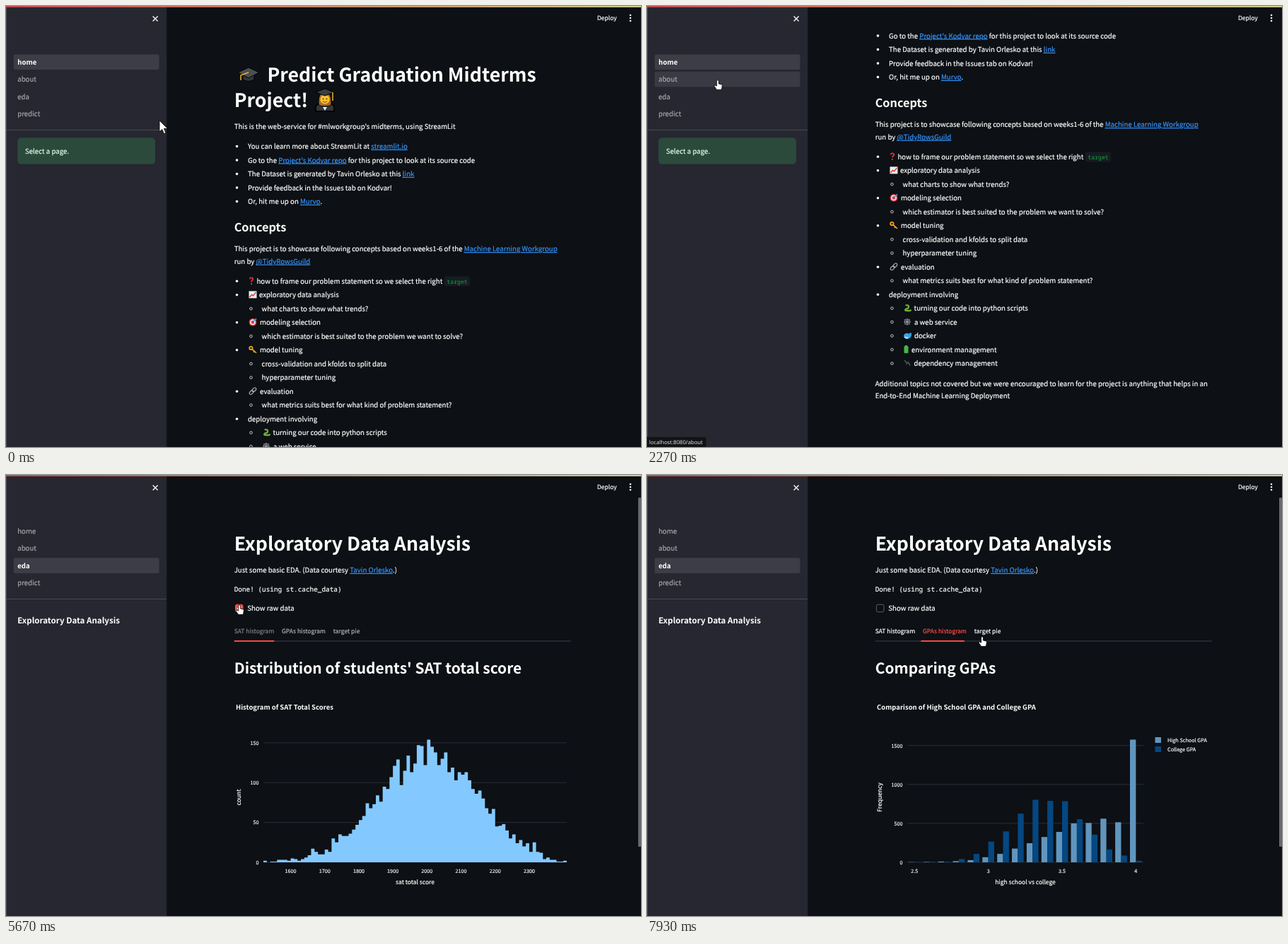
Animation, 898 px wide and 624 px high, one loop 8 s. Source, as an HTML page:

```html
<!DOCTYPE html>
<html lang="en">
<head>
<meta charset="utf-8">
<title>Midterm project demo</title>
<style>
html, body { margin: 0; width: 100%; height: 100%; overflow: hidden; background: #0d1014; }
svg { display: block; width: 100vw; height: 100vh; }
text {
  font: 9.68px "Noto Sans CJK JP", "Noto Sans CJK SC", "Noto Sans CJK KR", "Noto Sans CJK", "Noto Sans", sans-serif;
  color: #fff; stroke-width: .2px; white-space: pre; text-rendering: geometricPrecision;
}
text, tspan { fill: currentColor; stroke: currentColor; }
.h1, .h2, .h3 { font-weight: 700; stroke-width: 0; }
.h1 { font-size: 26.7px; }
.h2 { font-size: 20.95px; }
.h3 { font-size: 16.3px; }
.side { font-size: 11.55px; font-weight: 700; stroke-width: 0; }
.ct { font-size: 9.5px; font-weight: 700; stroke-width: 0; }
.s { font-size: 8.47px; }
.xs { font-size: 7.26px; color: #f0f3f8; }
.mid { text-anchor: middle; }
.end { text-anchor: end; }
.mono { font: 9.4px "Noto Sans Mono", "DejaVu Sans Mono", monospace; }
.code { font-size: 8.1px; color: #0fa844; stroke-width: 0; }
.tip { font: 7.7px "Open Sans", "Noto Sans", sans-serif; color: #eeeef0; stroke-width: 0; }
.dim { color: #8a8c91; }
.a { color: #3394ff; text-decoration: underline; }
.i { font-style: italic; }
.b { font-weight: 600; color: #b4b6ba; stroke-width: 0; }
</style>
</head>
<body>
<svg id="stage" viewBox="0 0 898 624" preserveAspectRatio="none"></svg>
<script>
const stage = document.getElementById('stage');
const RED = '#ff4b4b', GRID = '#292d36', BACK = '#0d1014';

// [link]  _italic_  *strong*
const rich = s => s
  .replace(/\[(.+?)\]/g, '<tspan class="a">$1</tspan>')
  .replace(/(^|\s)_(\w+)_/g, '$1<tspan class="i">$2</tspan>')
  .replace(/\*(.+?)\*/g, '<tspan class="b">$1</tspan>');
const text = (x, y, s, cls = '', more = '') =>
  `<text x="${x}" y="${y}" class="${cls}" ${more}>${rich(s)}</text>`;
const rect = (x, y, w, h, fill, more = '') =>
  `<rect x="${x}" y="${y}" width="${w}" height="${h}" fill="${fill}" ${more}/>`;
const circle = (x, y, r, fill, more = '') =>
  `<circle cx="${x}" cy="${y}" r="${r}" fill="${fill}" ${more}/>`;
const path = (d, fill, stroke = 'none', w = 1, more = '') =>
  `<path d="${d}" fill="${fill}" stroke="${stroke}" stroke-width="${w}" ${more}/>`;
const group = (id, body, more = '') => `<g id="${id}" ${more}>${body}</g>`;
const at = (x, y, body) => `<g transform="translate(${x} ${y})">${body}</g>`;
const round = 'stroke-linecap="round" stroke-linejoin="round"';
const bullet = (x, y) => circle(x, y, 1.8, '#fafafa');
const ring = (x, y) => circle(x, y, 1.8, 'none', 'stroke="#fafafa" stroke-width=".8"');

const icon = {
  ask: path('M-2.2-2.6Q-2-4.6 0-4.6T2.3-2.6Q2.3-1.2 .8-.3 0 .3 0 1.6', 'none', '#e0303a', 1.8) + circle(0, 4.2, 1.2, '#e0303a'),
  chart: rect(-5.5, -5, 11, 10, '#eceff1') + path('M-4.5 3.5L-1.5 0 .5 1.5 4.5-3.5', 'none', '#e53935', 1.5),
  goal: circle(0, 0, 5.4, '#d8343c') + circle(0, 0, 3.8, '#f5f5f5') + circle(0, 0, 2.3, '#d8343c') + path('M0 0L5-5', 'none', '#3aa0e8', 1.6),
  key: circle(-2.6, -2.4, 2.2, 'none', 'stroke="#f5a21f" stroke-width="1.8"') + path('M-1-1L5 4.6M2.2 2L.8 3.4', 'none', '#f5a21f', 1.7),
  chain: '<g transform="rotate(-45)" fill="none" stroke="#a9b3b9" stroke-width="1.2"><rect x="-6" y="-2" width="6.5" height="4" rx="2"/><rect x="-.5" y="-2" width="6.5" height="4" rx="2"/></g>',
  snake: path('M-1.5-4Q2.5-4.5 2-1.5T-1.5 1Q-5 3.5 0 3.8T4.8 3', 'none', '#6fae3d', 2.3, round),
  web: path('M-5 0H5M0-5V5M-3.6-3.6L3.6 3.6M-3.6 3.6L3.6-3.6', 'none', '#9aa0a6', .8) + circle(0, 0, 2, 'none', 'stroke="#9aa0a6" stroke-width=".8"') + circle(0, 0, 4, 'none', 'stroke="#9aa0a6" stroke-width=".8"'),
  whale: path('M-5.5 0Q-4-4 0-3.4 3-3 3.4-1L2.4-4 5.6-3.6Q6 4.5 0 4.5-5 4.5-5.5 0Z', '#35a7e6') + path('M-5 1Q-2 3 1 1.5L0 4.3Q-4 4.5-5 1Z', '#c6e6f8'),
  cell: rect(-3, -4.6, 6, 10, '#45b649', 'rx="1"') + rect(-1.3, -5.8, 2.6, 1.4, '#9aa0a6'),
  plug: path('M-4-4L0 0M-1.5 1.5L1.5-1.5 4 3.5', 'none', '#4a5055', 1.8),
  sign: rect(-5.5, -5.5, 11, 11, '#8f5bb5', 'rx="1.5"') + path('M-3 3L3-3M-.5-3H3V.5M-2.5-.5L.5 2.5', 'none', '#fff', 1.1),
  cap: path('M-8 0V7Q0 12 8 7V0Z', '#33373a', '#000', 1) + path('M-15-3L0-10 15-3 0 5Z', '#4a4f52', '#000', 1) + path('M0-3L-11 1V8', 'none', '#f0b429', 1.5),
  grad: path('M-13 16V10Q-12 4 0 4T13 10V16Z', '#33373a', '#000', 1.8) + path('M-9 5Q-10-11 0-11T9 5Q9 9 0 9T-9 5Z', '#a8682f', '#000', 1)
    + circle(0, -1, 6.6, '#fcc32c') + path('M-3.2 2Q0 4.5 3.2 2', 'none', '#6b4423', 1) + circle(-2.5, -1.5, .9, '#40331d') + circle(2.5, -1.5, .9, '#40331d')
    + path('M-13-11L0-16 13-11 0-6Z', '#3a3f42', '#000', 1) + path('M11-11V1', 'none', '#f0b429', 1.5) + path('M-3 10L0 15 3 10Z', '#eee'),
  wave: path('M-8-6L2 5M-4-10L5 2M1-10L8 1M6-6L10 4', 'none', '#fcc32c', 4.6, round) + path('M-8-1L3-4 10-3 12-6Q15-4 13 5 11 13 4 13T-6 7Z', '#fcc32c')
    + path('M-5-3L2 4M0-5L5 1', 'none', '#c98b1b', .8) + path('M-13 2Q-12 9-5 13M-10 1Q-8 6-4 9M4-14Q10-13 13-9M5-11Q9-10 11-8', 'none', '#2f8fe0', 1.5, round)
};

function homePage() {
  const top = ['You can learn more about StreamLit at [streamlit.io]',
    "Go to the [Project's Kodvar repo] for this project to look at its source code",
    'The Dataset is generated by Tavin Orlesko at this [link]',
    'Provide feedback in the Issues tab on Kodvar!', 'Or, hit me up on [Murvo].'];
  // level, text, text x, icon, icon x
  const items = [
    [0, 'how to frame our problem statement so we select the right', 354.5, 'ask', 347],
    [0, 'exploratory data analysis', 358, 'chart', 349],
    [1, 'what charts to show what trends?'],
    [0, 'modeling selection', 359, 'goal', 349],
    [1, 'which estimator is best suited to the problem we want to solve?'],
    [0, 'model tuning', 359, 'key', 349],
    [1, 'cross-validation and kfolds to split data'],
    [1, 'hyperparameter tuning'],
    [0, 'evaluation', 359, 'chain', 349],
    [1, 'what metrics suits best for what kind of problem statement?'],
    [0, 'deployment involving'],
    [1, 'turning our code into python scripts', 377.5, 'snake', 368],
    [1, 'a web service', 378, 'web', 368],
    [1, 'docker', 378, 'whale', 368.5],
    [1, 'environment management', 374, 'cell', 366.5],
    [1, 'dependency management', 377.5, 'plug', 368]];
  return at(343, 97, icon.cap) + text(369.5, 107, 'Predict Graduation Midterms', 'h1')
    + text(322.7, 143, 'Project!', 'h1') + at(451, 133, icon.grad)
    + text(322.7, 173.8, "This is the web-service for #mlworkgroup's midterms, using StreamLit")
    + top.map((s, i) => bullet(326.5, 198.6 + 19.5 * i) + text(342, 202 + 19.5 * i, s)).join('')
    + text(322.7, 319.3, 'Concepts', 'h3')
    + text(322.7, 347.2, 'This project is to showcase following concepts based on weeks1-6 of the [Machine Learning Workgroup]')
    + text(322.7, 364.8, 'run by [@TidyRowsGuild]')
    + rect(620, 382.5, 36, 14, '#171c22', 'rx="2"') + text(623.5, 392.6, 'target', 'mono code')
    + items.map(([lv, s, x = lv ? 361.5 : 342, ic, ix], i) => {
        const y = 389.2 + 19.5 * i;
        return (lv ? ring(346.5, y) : bullet(326.5, y)) + (ic ? at(ix, y - .3, icon[ic]) : '') + text(x, y + 3.5, s);
      }).join('')
    + text(322.7, 713.5, 'Additional topics not covered but we were encouraged to learn for the project is anything that helps in an')
    + text(322.7, 731, 'End-to-End Machine Learning Deployment');
}

function aboutPage() {
  const paras = [
    [162.5, 'Well, actually Ilvi is my nickname because my real name is quite a mouthful and when we were all little,',
      "my younger cousins (I was the _first_ grandchild) couldn't pronounce the 'v' from Vuna, so one of them",
      'dubbed me "Ilvi" and it stuck. My full name is actually Mirvunadesi.'],
    [225.5, "I got into coding because I've always dug into code when playing games. Some of you who has played The",
      "Plim 3, might recognized my social persona 'ilviwhimsey' from [the world fixes] I made for that game."],
    [271, "I've since dabbled in Quilo 3D modding a few years back, during the pandemic, and released a few mods",
      'for the game [Rebuilding the Lowmarsh]. You can find my mods on the [Brine Workroom].'],
    [316.5, "And now I got the Data-bug - everything is coming up data! I've just started my Data Science studies in the",
      "past year, it's been a year of interesting projects and community building with fellow learners."],
    [362, 'Feel free to connect with me on']];
  const links = ['Jobvanto', 'Kodvar', 'quibbly', 'Inkvellum modding blog', 'Inkvellum ilvistudies blog'];
  return text(324.5, 107, 'Hello, World!', 'h1') + at(522, 97, icon.wave)
    + text(324.5, 138, "I'm Ilvi") + at(367.5, 134.3, icon.sign) + text(377, 138, 'and delighted to make your acquataince.')
    + paras.map(([y, ...ls]) => ls.map((s, i) => text(324.5, y + 3.6 + 17.5 * i, s)).join('')).join('')
    + links.map((s, i) => bullet(328.8, 390.7 + 19.45 * i) + text(344, 394 + 19.45 * i, `[${s}]`)).join('')
    + text(324.5, 613.8, 'Made with *Streamlit*', 's dim');
}

const scores = [2, 0, 1, 1, 3, 3, 3, 2, 5, 4, 2, 4, 6, 9, 17, 13, 10, 10, 16, 13, 30, 25, 35, 33, 33, 36, 41, 47, 53, 58,
  74, 68, 73, 84, 76, 95, 92, 107, 121, 129, 97, 115, 134, 113, 124, 147, 146, 122, 154, 145, 138, 122, 130, 138, 113,
  119, 103, 113, 110, 113, 103, 92, 86, 90, 80, 68, 61, 67, 45, 46, 48, 40, 30, 35, 24, 28, 20, 24, 13, 25, 13, 12, 4, 6, 3, 3, 1, 1, 2];
const highGpa = [3, 5, 10, 15, 28, 65, 108, 176, 245, 325, 390, 500, 505, 560, 514, 1575];
const collegeGpa = [3, 6, 9, 42, 108, 265, 397, 625, 803, 788, 785, 553, 355, 165, 87, 20];

const yAxis = (vals, unit, x1, x2, label, title) =>
  vals.map(v => {
    const y = 548 - v * unit;
    return path(`M${x1} ${y}H${x2}`, 'none', GRID) + text(x1 - 6.5, y + 2.8, String(v), 'xs end');
  }).join('')
  + text(0, 0, label, 's mid', 'transform="translate(332 456) rotate(-90)"') + text(325, 331.6, title, 'ct');

function satChart(right, last) {
  const k = (right - 364) / 429, bin = 4.82 * k;
  const d = scores.map((v, i) => `V${(548 - v * 1.127).toFixed(1)}H${(364 + bin * (i + 1)).toFixed(2)}`).join('');
  let s = text(322.7, 280.6, "Distribution of students' SAT total score", 'h2')
    + yAxis([0, 50, 100, 150], 1.127, 364, right, 'count', 'Histogram of SAT Total Scores') + path(`M364 548${d}V548Z`, '#83c9ff');
  for (let v = 1600; v <= last; v += 100) s += text(364 + bin * (v - 1520) / 10, 562.6, String(v), 'xs mid');
  return s + text((364 + right) / 2, 578.6, 'sat total score', 's mid');
}

function gpaChart() {
  const light = '#6096be', dark = '#054781';
  const bars = (vals, dx, fill) => vals.map((v, i) => rect(378.3 + 20.87 * i + dx, 548 - v * .1102, 8.35, v * .1102, fill)).join('');
  return text(322.7, 280.6, 'Comparing GPAs', 'h2')
    + yAxis([0, 500, 1000, 1500], .1102, 368, 702, 'Frequency', 'Comparison of High School GPA and College GPA')
    + bars(highGpa, -8.35, light) + bars(collegeGpa, 0, dark)
    + [2.5, 3, 3.5, 4].map((v, i) => text(378.3 + 104.35 * i, 562.6, String(v), 'xs mid')).join('')
    + text(535, 578.6, 'high school vs college', 's mid')
    + rect(718.5, 371, 8.5, 8, light) + text(736, 378, 'High School GPA', 'xs')
    + rect(718.5, 384, 8.5, 8, dark) + text(736, 391, 'College GPA', 'xs');
}

const tabs = [['SAT histogram', 322.7], ['GPAs histogram', 390], ['target pie', 462.8]];
const edaPage = () => text(322.7, 107, 'Exploratory Data Analysis', 'h1')
  + text(322.7, 138, 'Just some basic EDA. (Data courtesy [Tavin Orlesko].)')
  + text(322.7, 164.6, 'Done! (using st.cache_data)', 'mono')
  + '<rect id="box" x="324.5" y="183.3" width="10.5" height="10.5" rx="2"/>'
  + path('M327 188.5L329 190.8 332.6 186.4', 'none', '#fff', 1.3, 'id="tick"')
  + text(341.3, 192.4, 'Show raw data')
  + tabs.map(([s, x], i) => text(x, 223.8, s, 's', `id="tab${i}"`)).join('')
  + rect(322.7, 234.3, 476, 1.4, '#31333f') + '<rect id="under" y="234" height="1.9" fill="#ff4b4b"/>'
  + group('satWide', satChart(793, 2300))
  + group('satSlim', satChart(791.6, 2400)
    + rect(323, 617.5, 475.5, 20, '#14181f', `rx="4" stroke="${GRID}"`)
    + path([357, 447, 513, 630, 706, 778].map(x => `M${x}.5 618V624`).join(''), 'none', GRID))
  + group('gpa', gpaChart());

const names = ['home', 'about', 'eda', 'predict'];
const navY = i => 79.2 + 24.45 * i;
const runner = circle(731.5, 11, 1.7, '#85878c')
  + path('M729.5 13.5L727 18.5 731 20.5 730 24M727 18.5L725.5 21.5H722M729 14L725 14.5 723.5 17M729.5 14.5L731.5 17H734', 'none', '#85878c', 1.8, round);
const bike = path('M723 20L726 15 730 20 733 20M726 15L731 14 733 20M726 15L729 11 731 14', 'none', '#85878c', 1.3, round)
  + [723, 733].map(x => circle(x, 20, 3.4, 'none', 'stroke="#85878c" stroke-width="1.2"')).join('') + circle(729.5, 10.8, 1.5, '#85878c');

stage.innerHTML =
  '<defs><linearGradient id="deco"><stop stop-color="#d2484c"/><stop offset="1" stop-color="#dcd988"/></linearGradient></defs>'
  + rect(0, 0, 898, 624, BACK)
  + group('page0', homePage()) + group('page1', aboutPage()) + group('page2', edaPage())
  + rect(227, 0, 671, 32, BACK)
  + group('run', group('runner', runner) + group('bike', bike) + text(741.5, 20.2, 'RUNNING...', 's dim') + text(800, 20.2, 'Stop', 's'))
  + text(836, 20.2, 'Deploy', 's') + [13, 17, 21].map(y => circle(883, y, 1.3, '#fafafa')).join('')
  + rect(894, 32, 4, 1, '#66686d', 'id="thumb" rx="1"')
  + rect(0, 0, 227.3, 624, '#262730') + rect(0, 2, 1, 622, '#4b4c53')
  + path('M207.6 14.6L214.6 21.6M214.6 14.6L207.6 21.6', 'none', '#fafafa', 1.4)
  + names.map((s, i) => rect(10.8, navY(i) - 10.8, 205.7, 21.6, '#3c3d46', `rx="2.7" id="bg${i}"`) + text(16.2, navY(i) + 3.5, s, '', `id="nav${i}"`)).join('')
  + rect(0, 175, 227, 1, '#484951')
  + group('hint', rect(16.2, 186.5, 194.8, 37.3, '#2b4a3c', 'rx="5"') + text(27, 209, 'Select a page.', '', 'style="color:#dffde9"'))
  + text(16.2, 210, 'Exploratory Data Analysis', 'side', 'id="sideTitle"')
  + group('tip', rect(-3, 609.5, 1, 18, '#121316', 'id="tipBox" rx="3" stroke="#2a2b30" stroke-width=".7"') + text(3, 619.7, '', 'tip', 'id="tipText"'))
  + rect(0, 0, 898, 1.8, 'url(#deco)')
  + group('cursor',
      group('arrow', path('M0 0V16L3.8 12.6 6.5 18.7 9 17.6 6.4 11.6H11.6Z', '#fff', '#000', .8))
      + group('hand', path('M-1.4 1.2a1.4 1.4 0 0 1 2.8 0V5l3.8.9q1.4.4 1.2 1.9l-.7 4.2q-.3 1.6-1.6 1.6H-.2q-1.2 0-1.9-1l-2.6-4.2q-.5-1.3.8-1.4l2.5 1.2z', '#fff', '#000', .8)));

const el = {};
stage.querySelectorAll('[id]').forEach(e => el[e.id] = e);
const show = (id, on) => el[id].style.display = on ? '' : 'none';
const set = (id, o) => { for (const k in o) el[id].setAttribute(k, o[k]); };

// time, x, y
const moves = [[70, 217, 162], [230, 224, 158], [600, 150, 131], [800, 150, 131], [1330, 326, 228], [1400, 328, 230],
  [1600, 332, 236], [1800, 332, 236], [2260, 100, 105], [2400, 102, 106], [2600, 109, 126], [3400, 109, 126],
  [3730, 127, 156], [3870, 125, 157], [4000, 125, 157], [4070, 123, 157], [4330, 117, 157], [4730, 117, 157],
  [5400, 330, 184], [6600, 330, 184], [6930, 447, 208], [7250, 428, 219], [7670, 428, 219], [7930, 474, 229]];
const scrolls = [[930, 0], [1400, 166], [1600, 176]];
const busy = [[2333, 2667, 1], [2667, 2880, .35], [2990, 3640, 1], [3640, 3800, .35], [5730, 6150, 1], [6150, 6330, .35], [6660, 7060, 1], [7060, 7200, .35]];
const tips = [[800, 1390, 2, 1], [1390, 1460, 2, .6], [2190, 2600, 1, 1], [2600, 3530, 2, 1], [3530, 5130, 3, 1], [5130, 5260, 3, .5]];

function track(keys, t) {
  if (t <= keys[0][0]) return keys[0].slice(1);
  const j = keys.findIndex(k => k[0] > t);
  if (j < 0) return keys[keys.length - 1].slice(1);
  const a = keys[j - 1], b = keys[j], u = (t - a[0]) / (b[0] - a[0]), e = u * u * (3 - 2 * u);
  return a.slice(1).map((v, i) => v + (b[i + 1] - v) * e);
}
const within = (spans, t) => spans.find(s => t >= s[0] && t < s[1]);

function draw(ms) {
  const step = 1000 / 15, t = Math.floor((ms + 4) / step) * step;
  const page = t < 2330 ? 0 : t < 2930 ? 1 : 2;
  const [x, y] = track(moves, t), [scroll] = track(scrolls, t);
  const checked = t >= 5660 && t < 6660, table = t >= 6130 && t < 7130, gpa = t >= 7720, ready = t >= 3460;

  for (let i = 0; i < 3; i++) show('page' + i, i === page);
  set('page0', { transform: `translate(0 ${-scroll})` });
  show('hint', page < 2);
  show('sideTitle', page === 2);

  const overNav = x > 10.8 && x < 216.5;
  names.forEach((_, i) => {
    const active = i === page, hover = overNav && Math.abs(y - navY(i)) < 11;
    show('bg' + i, active || hover);
    set('bg' + i, { fill: active ? '#3c3d46' : '#393a43' });
    el['nav' + i].style.cssText = active ? 'font-weight:700;stroke-width:0' : 'color:#a5a6aa';
  });

  const run = within(busy, t);
  show('run', run);
  if (run) el.run.style.opacity = run[2];
  show('bike', page === 1);
  show('runner', page !== 1);

  const tip = within(tips, t);
  show('tip', tip);
  if (tip) {
    el.tip.style.opacity = tip[3];
    el.tipText.textContent = 'localhost:8080/' + names[tip[2]];
    set('tipBox', { width: tip[2] === 3 ? 90 : tip[2] === 2 ? 79 : 87 });
  }

  show('thumb', x > 227);
  set('thumb', page === 0 ? { y: 32 + scroll * .53, height: 448 } : { y: 32, height: table ? 202 : 494 });

  set('box', { fill: checked ? RED : 'none', stroke: checked ? RED : '#5a5c63' });
  show('tick', checked);
  const faded = t >= 5660 && t < 5860, clicked = t >= 7660;
  tabs.forEach((_, i) => {
    const on = i === (clicked ? 1 : 0);
    el['tab' + i].style.color = faded ? (on ? '#7f8187' : '#b0b2b6') : on ? RED : '#fff';
  });
  const u = clicked ? 1 - Math.pow(1 - Math.min(1, (t - 7600) / 500), 3) : 0;
  set('under', { x: 322.7 + 67.3 * u, width: 56.5 + 5 * u });
  show('satWide', ready && !table && !gpa);
  show('satSlim', table);
  show('gpa', gpa);

  const hand = (overNav && y > 68 && y < 163.5) || (page === 2 && x > 322 && ((x < 409 && y > 182 && y < 196) || (x < 502 && y > 205 && y < 236)));
  show('hand', hand);
  show('arrow', !hand);
  set('cursor', { transform: `translate(${x.toFixed(1)} ${y.toFixed(1)})` });
}

const start = performance.now();
(function loop() {
  draw((performance.now() - start) % 8000);
  requestAnimationFrame(loop);
})();
</script>
</body>
</html>
```
